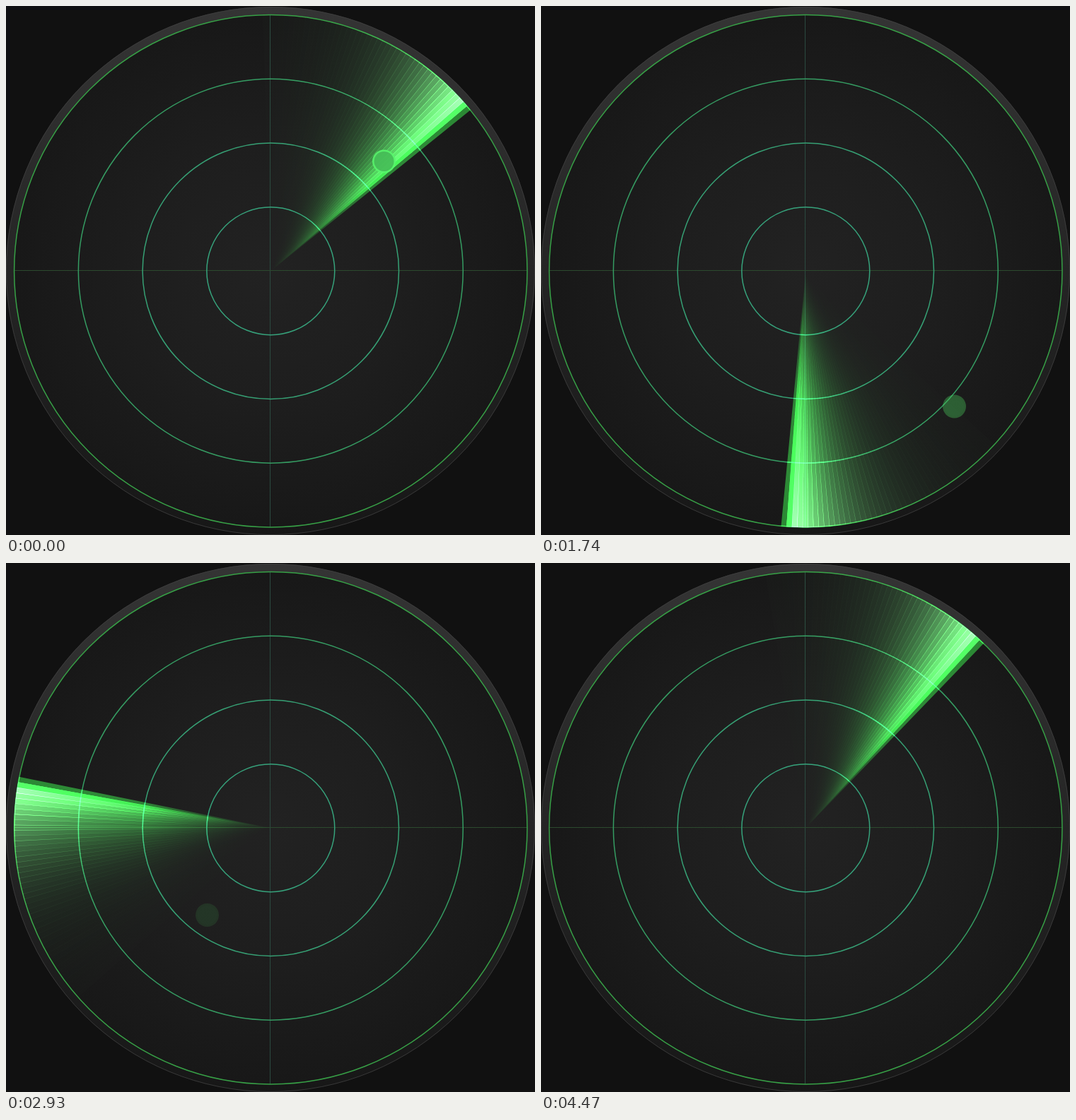
An HTML page with a canvas that plays this animation: 748x749 px, repeating every 4.54 s.

```html
<!DOCTYPE html>
<html lang="en">
<head>
<meta charset="utf-8">
<title>Radar</title>
<style>
html, body { margin: 0; width: 100%; height: 100%; overflow: hidden; background: #111; }
canvas { display: block; }
</style>
</head>
<body>
<canvas id="radar" width="748" height="749"></canvas>
<script>
const ctx = document.getElementById('radar').getContext('2d');
const LOOP = 4540, HOLD = 130, STEP = 70, STEPS = 64;
const CX = 374.3, CY = 375.2, R = 363;
const TAU = Math.PI * 2, RAD = Math.PI / 180;
const START = -38.9, UNIT = 2.4, STRIP = 1.2, STRIPS = 44;

const rings = [[1 / 4, '#36a27b'], [2 / 4, '#36a074'], [3 / 4, '#359c62'], [1, '#37a046']];

// x, y, step at which the beam lights it, steps already faded by then
const contacts = [
  [534.5, 220, 0, 3],
  [584.5, 567, 15, 0],
  [328, 598.5, 26, 0],
  [284.5, 498.5, 30, 0],
  [293.3, 303.5, 47, 0]
];

// radius, green share, white share
const profile = [[0, 0, 0], [.12, .17, .01], [.25, .43, .05], [.5, .88, .2], [.75, 1, .52], [1, 1, 1]];

function gradient(g, stops) {
  stops.forEach(([at, color]) => g.addColorStop(at, color));
  return g;
}

function disc(x, y, r) {
  ctx.beginPath();
  ctx.arc(x, y, r, 0, TAU);
}

function stripLight(i) {
  if (i === 0) return [112, 0];
  if (i === 1) return [222, 24];
  const decay = Math.exp(-(i - 2) / 8);
  return [195 * decay, 108 * decay];
}

const stripFills = Array.from({ length: STRIPS }, (_, i) => {
  const [green, white] = stripLight(i);
  const stops = profile.map(([at, g, w]) => {
    const glow = green * g, pale = white * w;
    const rgb = [glow * .17 + pale, glow + pale, glow * .25 + pale].map(Math.round);
    return [at, `rgb(${rgb})`];
  });
  return gradient(ctx.createRadialGradient(CX, CY, 0, CX, CY, R), stops);
});

const rimFill = gradient(ctx.createLinearGradient(0, 0, 0, 749),
  [[0, '#343434'], [.5, '#252525'], [1, '#171717']]);
const faceFill = gradient(ctx.createRadialGradient(CX, CY, 0, CX, CY, R),
  [[0, '#222'], [.5, '#1e1e1e'], [1, '#181818']]);

function drawDial() {
  ctx.fillStyle = '#111';
  ctx.fillRect(0, 0, 748, 749);
  disc(374, 375, 374);
  ctx.fillStyle = rimFill;
  ctx.fill();
  disc(374, 375, 373.6);
  ctx.lineWidth = .8;
  ctx.strokeStyle = '#404040';
  ctx.stroke();
  disc(CX, CY, R);
  ctx.fillStyle = faceFill;
  ctx.fill();

  ctx.fillStyle = '#2b4a40';
  ctx.fillRect(373, CY - R, 1, 2 * R);
  ctx.fillStyle = '#2c4a2e';
  ctx.fillRect(CX - R, 374, 2 * R, 1);

  ctx.lineWidth = 1.5;
  for (const [share, color] of rings) {
    disc(CX, CY, R * share - .3);
    ctx.strokeStyle = color;
    ctx.stroke();
  }
}

function drawSweep(angle) {
  ctx.globalCompositeOperation = 'lighter';
  stripFills.forEach((fill, i) => {
    const lead = (angle - i * STRIP) * RAD;
    ctx.beginPath();
    ctx.moveTo(CX, CY);
    ctx.arc(CX, CY, R, lead - (STRIP + .06) * RAD, lead);
    ctx.fillStyle = fill;
    ctx.fill();
  });
  ctx.globalCompositeOperation = 'source-over';
}

function drawContacts(step) {
  for (const [x, y, on, faded] of contacts) {
    const age = step - on + faded;
    const alpha = step < on ? 0 : Math.min(1, 1.2 - age * .1);
    if (alpha <= 0) continue;
    disc(x, y, 16.5);
    ctx.fillStyle = `rgba(88,245,108,${alpha})`;
    ctx.fill();
    disc(x, y, 14);
    ctx.fillStyle = `rgba(48,120,62,${alpha * .45})`;
    ctx.fill();
  }
}

// The beam turns in whole units, so its steps are slightly uneven.
function beamAngle(step) {
  const lag = step % 32 ? .05 : 0;
  return START + UNIT * Math.floor(step * 150 / STEPS - lag);
}

function render(ms) {
  const t = ms % LOOP;
  const step = t < HOLD ? 0 : Math.min(STEPS - 1, 1 + Math.floor((t - HOLD) / STEP));
  drawDial();
  drawSweep(beamAngle(step));
  drawContacts(step);
}

let begin;
function tick(now) {
  begin ??= now;
  render(now - begin);
  requestAnimationFrame(tick);
}
render(0);
requestAnimationFrame(tick);
</script>
</body>
</html>
```
